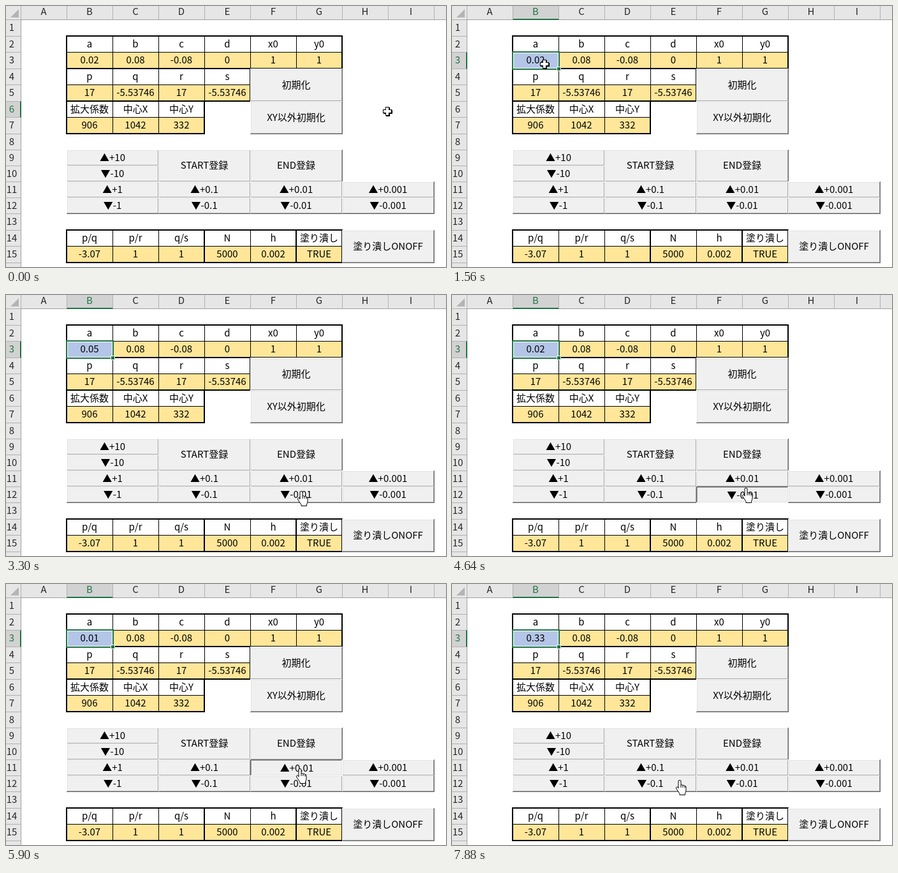
An HTML page with a canvas for the animation above (8 s loop, 690 px wide and 409 px high).

```html
<!DOCTYPE html>
<html lang="ja">
<head>
<meta charset="utf-8">
<style>
html, body { margin: 0; width: 100%; height: 100%; overflow: hidden; background: #fff; }
canvas { display: block; }
</style>
</head>
<body>
<canvas id="stage" width="690" height="409"></canvas>
<script>
const ctx = document.getElementById('stage').getContext('2d');
const LOOP = 8000, COL = 72, ROW = 25, HEAD = 23;
const GREEN = '#217346', YELLOW = '#ffe699', BLUE = '#b4c6e7';
const FONT = '350 15px "Noto Sans CJK JP", "Noto Sans CJK", "Noto Sans", sans-serif';

const tables = [
  { row: 2, heads: 'a b c d x0 y0', values: '0.02 0.08 -0.08 0 1 1' },
  { row: 4, heads: 'p q r s', values: '17 -5.53746 17 -5.53746' },
  { row: 6, heads: '拡大係数 中心X 中心Y', values: '906 1042 332' },
  { row: 14, heads: 'p/q p/r q/s N h 塗り潰し', values: '-3.07 1 1 5000 0.002 TRUE', thick: 'EG' }
].map(t => ({ ...t, heads: t.heads.split(' '), values: t.values.split(' ') }));

// A row that ends in a thick border is one pixel taller.
const thickBelow = new Set(tables.flatMap(t => [t.row - 1, t.row + 1]));
const rowY = r => {
  let y = 21;
  for (let i = 1; i < r; i++) y += ROW + thickBelow.has(i);
  return y;
};
const colX = c => HEAD + (c - 1) * COL;
const colOf = letter => letter.charCodeAt(0) - 64;

// Buttons span two columns and overlap their lower and right neighbours by a pixel.
function button(label, at, rows = 1) {
  const c = colOf(at), r = +at.slice(1), y = rowY(r);
  return { label, x: colX(c), y, w: 2 * COL + 1, h: rowY(r + rows) - y + 1 };
}
const buttons = [
  button('初期化', 'F4', 2), button('XY以外初期化', 'F6', 2),
  button('▲+10', 'B9'), button('▼-10', 'B10'),
  button('START登録', 'D9', 2), button('END登録', 'F9', 2),
  button('塗り潰しONOFF', 'H14', 2),
  ...['1', '0.1', '0.01', '0.001'].flatMap((step, i) => [
    button('▲+' + step, 'BDFH'[i] + 11), button('▼-' + step, 'BDFH'[i] + 12)
  ])
];

const HOLD = 100;
const clicks = [
  { first: 2220, every: 330, count: 3, step: 0.01 },
  { first: 3360, every: 245, count: 3, step: -0.01 },
  { first: 4640, every: 250, count: 3, step: -0.01 },
  { first: 5480, every: 205, count: 4, step: 0.01 },
  { first: 6880, every: 260, count: 3, step: 0.1 }
].flatMap(b => Array.from({ length: b.count }, (_, i) => ({ down: b.first + i * b.every, step: b.step })));

// The pointer rests at each stop and eases on to the next.
const stops = [
  { from: 0, to: 60, x: 598, y: 165 },
  { from: 420, to: 840, x: 655, y: 195 },
  { from: 1380, to: 1570, x: 145, y: 91 },
  { from: 1680, to: 1680, x: 300, y: 245 },
  { from: 2040, to: 3060, x: 464, y: 287 },
  { from: 3270, to: 3700, x: 463, y: 307 },
  { from: 3960, to: 5240, x: 461, y: 302 },
  { from: 5480, to: 6380, x: 461, y: 289 },
  { from: 6800, to: 7520, x: 367, y: 288 },
  { from: 7760, to: LOOP, x: 357, y: 307 }
];

function pointerAt(t) {
  const i = stops.findIndex(s => t <= s.to);
  const b = stops[i], a = stops[i - 1];
  if (t >= b.from) return [b.x, b.y];
  const u = (t - a.to) / (b.from - a.to), e = u * u * (3 - 2 * u);
  return [a.x + (b.x - a.x) * e, a.y + (b.y - a.y) * e].map(Math.round);
}

function valueAt(t) {
  const v = clicks.filter(k => t >= k.down + HOLD).reduce((sum, k) => sum + k.step, 0.02);
  return Math.abs(v) < 1e-9 ? v.toExponential(1).toUpperCase() : String(+v.toFixed(5));
}

function pressedAt(t) {
  const k = clicks.find(k => t >= k.down && t < k.down + HOLD);
  return k && (k.step > 0 ? '▲+' : '▼') + k.step;
}

function selectionAt(t) {
  if (t < 480) return { c: 20, r: 6 };
  return t < 1440 ? { c: 9, r: 7 } : { c: 2, r: 3 };
}

function rect(color, x, y, w, h) {
  ctx.fillStyle = color;
  ctx.fillRect(x, y, w, h);
}

function text(s, x, y, color = '#000') {
  ctx.fillStyle = color;
  ctx.fillText(s, x, Math.round(y + 5.4));
}

const hLine = (c1, c2, r, w = 1) => rect('#000', colX(c1) - w + 1, rowY(r) - w + 1, colX(c2) - colX(c1) + w, w);
const vLine = (c, r1, r2, w = 1) => rect('#000', colX(c) - w + 1, rowY(r1) - w + 1, w, rowY(r2) - rowY(r1) + w);

function drawHeaders(sel) {
  rect('#e6e6e6', 0, 0, 690, 22);
  rect('#e6e6e6', 0, 0, HEAD + 1, 409);
  ctx.fillStyle = '#b4b4b4';
  ctx.beginPath();
  ctx.moveTo(20, 5);
  ctx.lineTo(20, 18);
  ctx.lineTo(7, 18);
  ctx.fill();
  rect('#9f9f9f', 0, 21, 690, 1);
  rect('#9f9f9f', HEAD, 0, 1, 409);
  for (let c = 1; c <= 10; c++) {
    const x = colX(c), on = c === sel.c;
    if (on) {
      rect('#d2d2d2', x, 0, COL, 20);
      rect(GREEN, x, 20, COL + 1, 2);
    }
    rect('#b1b1b1', x, 0, 1, 21);
    if (c < 10) text(String.fromCharCode(64 + c), x + COL / 2, 8.5, on ? GREEN : '#262626');
  }
  for (let r = 1; r <= 16; r++) {
    const y = rowY(r), h = rowY(r + 1) - y, on = r === sel.r;
    if (on) {
      rect('#d2d2d2', 0, y, HEAD - 1, h);
      rect(GREEN, HEAD - 1, y, 2, h + 1);
    }
    rect('#b1b1b1', 0, y, HEAD, 1);
    if (r < 16) text(r, 9, y + h / 2, on ? GREEN : '#262626');
  }
}

function drawTable({ row, heads, values, thick = '' }) {
  const end = heads.length + 2, mid = rowY(row + 1), bottom = rowY(row + 2);
  rect(YELLOW, colX(2), mid, heads.length * COL, bottom - mid);
  hLine(2, end, row + 1);
  for (let c = 2; c <= end; c++) {
    const strong = c === 2 || c === end || [...thick].some(l => colOf(l) === c);
    vLine(c, row, row + 2, strong ? 2 : 1);
  }
  hLine(2, end, row, 2);
  hLine(2, end, row + 2, 2);
  heads.forEach((head, i) => {
    const x = colX(i + 2) + COL / 2;
    text(head, x, (rowY(row) + mid) / 2);
    if (row > 2 || i) text(values[i], x, (mid + bottom) / 2);
  });
}

function drawSelection({ c, r }) {
  const x = colX(c), y = rowY(r), h = rowY(r + 1) - y;
  if (c === 2) rect(BLUE, x, y, COL, h);
  ctx.lineWidth = 1;
  ctx.strokeStyle = '#fff';
  ctx.strokeRect(x + 1.5, y + 1.5, COL - 2, h - 2);
  ctx.lineWidth = 2;
  ctx.strokeStyle = GREEN;
  ctx.strokeRect(x, y, COL + 1, h + 1);
  rect('#fff', x + COL - 3, y + h - 3, 7, 7);
  rect(GREEN, x + COL - 2, y + h - 2, 5, 5);
}

function bevel({ x, y, w, h }, inset, light, dark) {
  const l = x + inset, t = y + inset, bw = w - 2 * inset, bh = h - 2 * inset;
  rect(light, l, t, bw, 1);
  rect(light, l, t, 1, bh);
  rect(dark, l, t + bh - 1, bw, 1);
  rect(dark, l + bw - 1, t, 1, bh);
}

function drawButton(b, down) {
  rect('#f0f0f0', b.x, b.y, b.w, b.h);
  bevel(b, 0, down ? '#696969' : '#fff', down ? '#fff' : '#696969');
  bevel(b, 1, down ? '#a0a0a0' : '#e3e3e3', down ? '#e3e3e3' : '#a0a0a0');
  text(b.label, b.x + COL + down, b.y + (b.h - 1) / 2 + down);
}

const hand = new Path2D('M-2 2Q-2 .5 0 .5T2 2V8Q3 7 5 8.5Q7 7.7 8 9.5Q10 9 10 12V16' +
  'Q10 19 8.5 21V23.5H0V21.5L-5 14Q-6.5 11.5-4.5 11T-2 13Z');
const knuckles = new Path2D('M2 8V12M5 8.5V12M8 9.5V12.5');

function drawPointer(x, y) {
  const overButton = buttons.some(b => x >= b.x && x < b.x + b.w && y >= b.y && y < b.y + b.h);
  ctx.save();
  ctx.translate(x, y);
  if (overButton) {
    ctx.lineWidth = 1;
    ctx.lineJoin = 'round';
    ctx.strokeStyle = '#000';
    ctx.fillStyle = '#fff';
    ctx.fill(hand);
    ctx.stroke(hand);
    ctx.stroke(knuckles);
  } else {
    const plus = (color, arm, half, d) => {
      rect(color, d - half, d - arm, 2 * half, 2 * arm);
      rect(color, d - arm, d - half, 2 * arm, 2 * half);
    };
    plus('#000', 7, 3, 1);
    plus('#000', 7, 3, 0);
    plus('#fff', 6, 2, 0);
  }
  ctx.restore();
}

function draw(t) {
  const sel = selectionAt(t), pressed = pressedAt(t);
  ctx.font = FONT;
  ctx.textAlign = 'center';
  rect('#fff', 0, 0, 690, 409);
  drawHeaders(sel);
  tables.forEach(drawTable);
  buttons.forEach(b => drawButton(b, b.label === pressed));
  if (sel.c < 10) drawSelection(sel);
  text(valueAt(t), colX(2) + COL / 2, (rowY(3) + rowY(4)) / 2);
  drawPointer(...pointerAt(t));
}

const start = performance.now();
function tick() {
  draw((performance.now() - start) % LOOP);
  requestAnimationFrame(tick);
}
tick();
</script>
</body>
</html>
```
